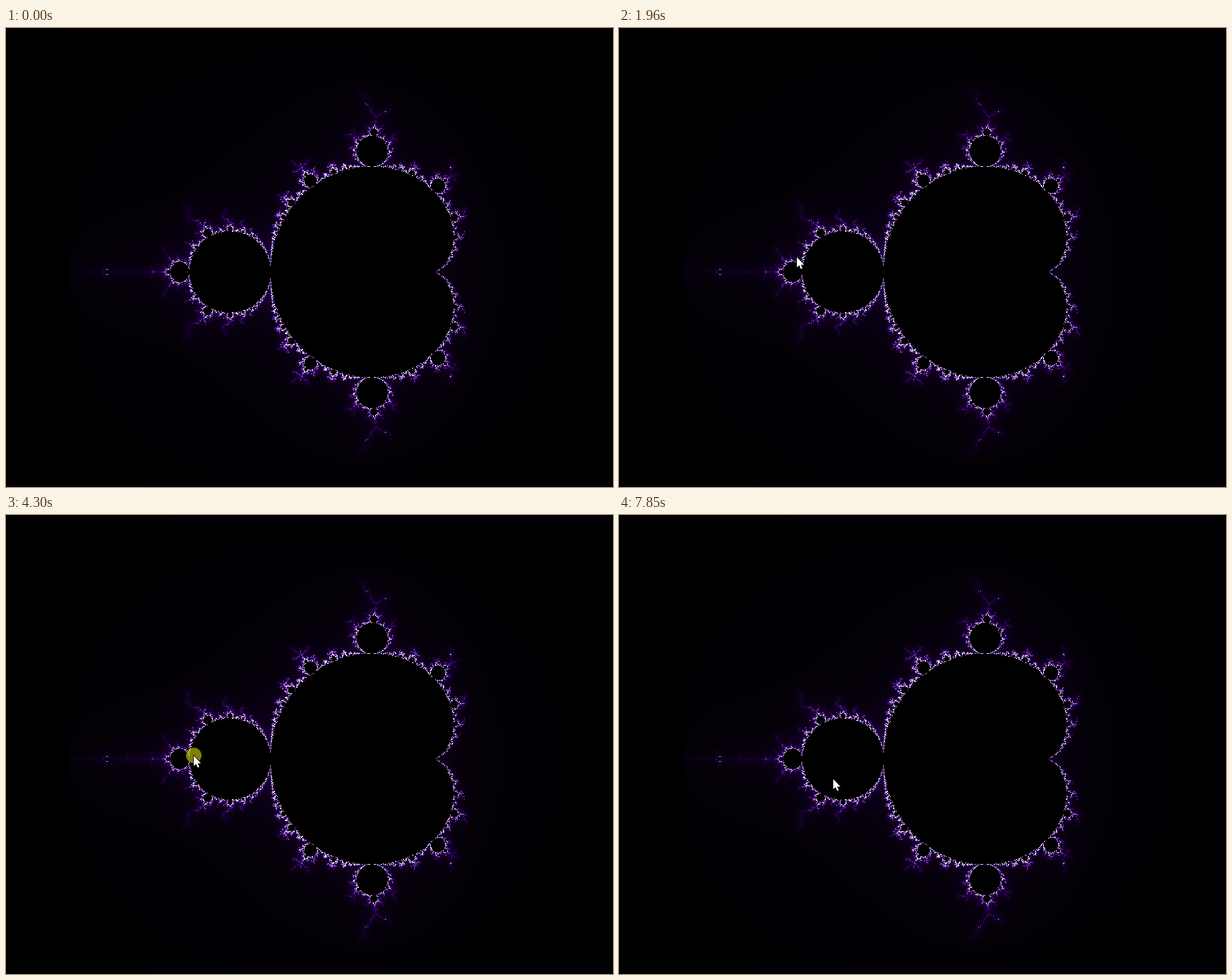
Recreate the animation shown at these times as an HTML page with a canvas. Size 860 by 651 pixels, loop 8000 ms.

```html
<!DOCTYPE html>
<html lang="en">
<head>
<meta charset="utf-8">
<title>Fractal explorer</title>
<style>
  html, body { margin: 0; width: 100%; height: 100%; overflow: hidden; background: #000; }
  canvas, svg { position: absolute; left: 0; top: 0; display: block; }
</style>
</head>
<body>
<canvas id="fractal" width="860" height="651"></canvas>
<svg width="860" height="651" viewBox="0 0 860 651">
  <g id="pointer" visibility="hidden">
    <circle id="press" cy="-0.5" r="11" fill="#ff0" fill-opacity=".5"/>
    <path d="M0 0V14.6L3.3 11.6L5.7 16.8L7.9 15.8L5.6 10.7H10.2Z" fill="#fff"
      stroke="#000" stroke-width="1.6" paint-order="stroke"/>
  </g>
</svg>
<script>
const W = 860, H = 651, LOOP = 8000;
const SCALE = 230, X0 = 547, Y0 = 345.5, MAX_ITER = 250, LEFT_EDGE = 90;
const PRESS_START = 2980, PRESS_END = 5390;

function escapeTime(cx, cy) {
  let x = 0, y = 0;
  for (let n = 0; n < MAX_ITER; n++) {
    const xx = x * x, yy = y * y;
    if (xx + yy > 4) return n;
    y = 2 * x * y + cy;
    x = xx - yy + cx;
  }
  return 0;
}

// Black through indigo and violet to white
function shade(n) {
  const blue = Math.min(255, n ** 1.3);
  const green = 255 * Math.min(1, Math.max(0, (n - 35) / 65)) ** 1.2;
  return [blue * 0.5 + green * 0.5, green, blue];
}

function drawFractal() {
  const ctx = document.getElementById('fractal').getContext('2d');
  const img = ctx.createImageData(W, H);
  for (let j = 0, p = 0; j < H; j++) {
    for (let i = 0; i < W; i++, p += 4) {
      const n = i < LEFT_EDGE ? 0 : escapeTime((i - X0) / SCALE, (j - Y0) / SCALE);
      const [r, g, b] = shade(n);
      img.data[p] = r;
      img.data[p + 1] = g;
      img.data[p + 2] = b;
      img.data[p + 3] = 255;
    }
  }
  ctx.putImageData(img, 0, 0);
}

const steps = [];

// Hold the pointer at evenly timed stops along a quadratic curve
function glide(start, end, count, from, via, to) {
  for (let i = 0; i < count; i++) {
    const k = i / (count - 1);
    const at = a => (1 - k) ** 2 * from[a] + 2 * k * (1 - k) * via[a] + k * k * to[a];
    steps.push({ time: start + (end - start) * k, x: at(0), y: at(1) });
  }
}

function jump(time, x, y) {
  steps.push({ time, x, y });
}

glide(290, 940, 9, [628, 618], [440, 270], [321, 272]);
jump(1020, 352, 297);
glide(1100, 1580, 7, [334, 302], [268, 315], [237, 318]);
glide(1730, 1810, 2, [242, 323], [246, 326], [250, 329]);
glide(1960, 2040, 2, [252, 325], [252, 323], [252, 321]);
jump(2210, 250, 321);
glide(2360, 2590, 3, [249, 322], [248, 323], [247, 323]);
jump(2750, 246.5, 323);
glide(3440, 3530, 2, [248, 323.5], [249, 324], [250, 325]);
glide(3680, 3840, 3, [252, 331], [256, 338], [259.5, 341.5]);
jump(4000, 263, 341.5);
jump(4150, 265, 341.5);
jump(4300, 266, 341.5);
jump(4840, 267, 341.5);
glide(5700, 5940, 4, [328, 354], [480, 408], [624, 449]);
glide(6020, 6180, 3, [500, 464], [332, 469], [218, 462]);
glide(6480, 6810, 5, [232, 452], [310, 398], [360, 386]);
glide(6970, 7290, 5, [359, 386], [353, 385], [347, 384]);
glide(7450, 7850, 6, [345, 383], [321, 377], [303.5, 374.5]);

const pointer = document.getElementById('pointer');
const press = document.getElementById('press');

function render(t) {
  const step = steps.findLast(s => s.time <= t + 5);
  pointer.setAttribute('visibility', step ? 'visible' : 'hidden');
  if (step) pointer.setAttribute('transform', `translate(${step.x} ${step.y})`);
  press.setAttribute('display', t >= PRESS_START && t < PRESS_END ? 'inline' : 'none');
}

function tick() {
  render(performance.now() % LOOP);
  requestAnimationFrame(tick);
}

drawFractal();
tick();
</script>
</body>
</html>
```
